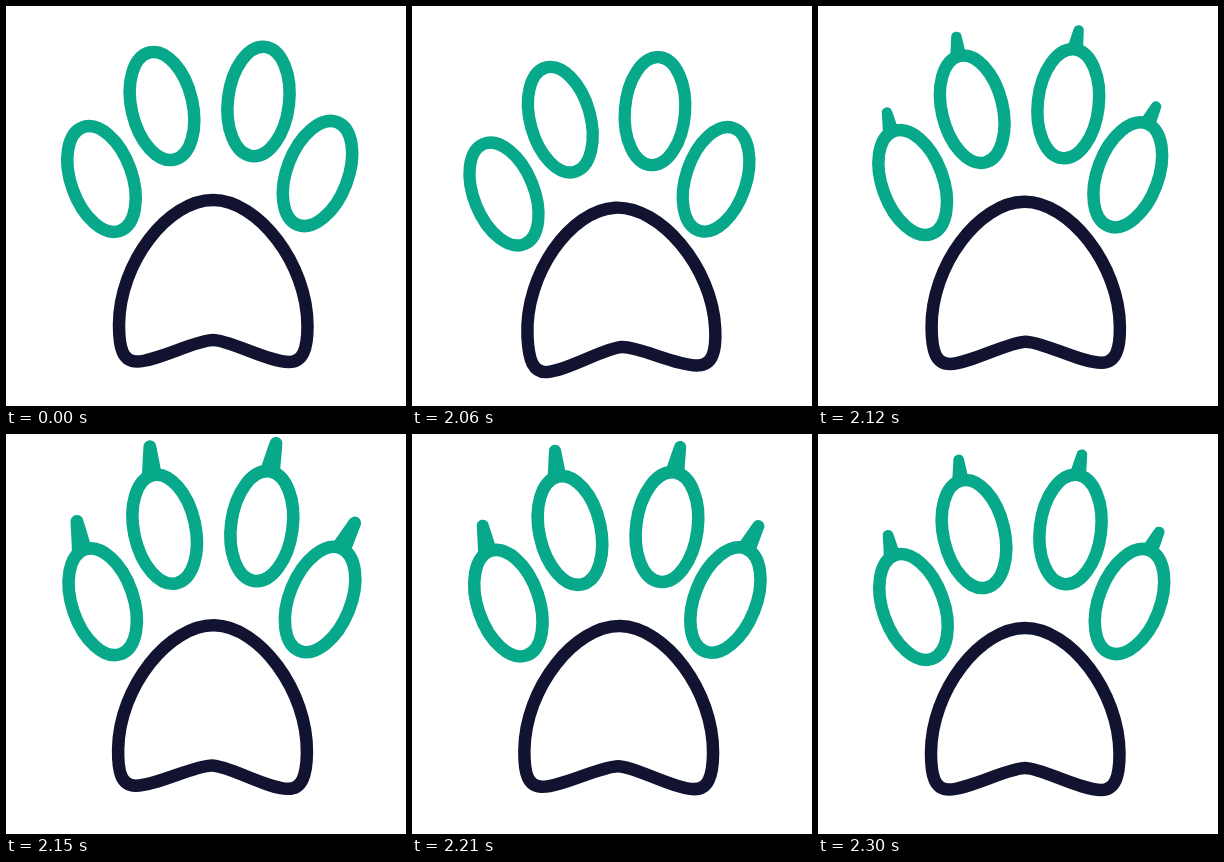
Recreate the animation shown at these times as an HTML page. Size 400x400 px, loop 2330 ms.

```html
<!DOCTYPE html>
<html lang="en">
<head>
<meta charset="utf-8">
<title>Paw</title>
<style>
  @property --sway { syntax: "<number>"; inherits: true; initial-value: 0; }
  @property --claw { syntax: "<number>"; inherits: true; initial-value: 0; }

  html, body { margin: 0; width: 100%; height: 100%; overflow: hidden; background: #fff; }

  svg {
    display: block;
    width: 100%;
    height: 100%;
    fill: none;
    stroke-width: 12.5;
    animation: scratch 2330ms step-end infinite;
  }

  /* Sway turns, shrinks and shifts each part together */
  .pad, .toes {
    transform: matrix(
      calc(1 - var(--k) * var(--sway)), calc(-1 * var(--turn) * var(--sway)),
      calc(var(--turn) * var(--sway)), calc(1 - var(--k) * var(--sway)),
      calc(var(--x) * var(--sway)), calc(var(--y) * var(--sway)));
  }
  .pad { --k: .005; --turn: .055; --x: -4.1; --y: 9.3; stroke: #121331; stroke-linejoin: round; }
  .toes { --k: .02; --turn: .05; --x: -4.8; --y: 11.7; stroke: #08a88a; }

  /* Claws grow in length faster than in width */
  .claw {
    fill: #08a88a;
    stroke: none;
    transform: scale(calc(.35 + .65 * var(--claw)), var(--claw));
  }

  @keyframes scratch {
    0%      { --sway: 0;    --claw: 0; }
    87.124% { --sway: .42;  --claw: 0; }
    88.412% { --sway: .86;  --claw: 0; }
    89.699% { --sway: 1;    --claw: .25; }
    90.987% { --sway: .2;   --claw: .7; }
    92.274% { --sway: -.3;  --claw: 1; }
    93.562% { --sway: -.28; --claw: .97; }
    94.849% { --sway: -.22; --claw: .91; }
    96.137% { --sway: -.14; --claw: .84; }
    97.424% { --sway: -.06; --claw: .78; }
    98.712% { --sway: 0;    --claw: .74; }
    100%    { --sway: 0;    --claw: 0; }
  }
</style>
</head>
<body>
<svg viewBox="-200 -200 400 400">
  <defs>
    <ellipse id="toe" rx="30.6" ry="55"/>
    <path id="nail" d="M-10.5 2C-9-5-8.3-14-6.4-28A6.4 6.4 0 0 1 6.4-28C8.3-14 9-5 10.5 2Z"/>
  </defs>
  <path class="pad" d="M7-6C52-6 101.5 58 101.5 120C101.5 143 97 156 83 156C62 156 24 134 7 134C-10 134-50 155.5-69 155.5C-83 155.5-87 143-87 119C-87 57-38-6 7-6Z"/>
  <g class="toes">
    <use href="#toe" transform="translate(-104.5 -27) rotate(-19.6)"/>
    <use href="#toe" transform="translate(-44 -100) rotate(-13)"/>
    <use href="#toe" transform="translate(52.5 -104.5) rotate(7)"/>
    <use href="#toe" transform="translate(111.5 -32.5) rotate(21)"/>
    <g transform="translate(-126 -79) rotate(-11)"><use class="claw" href="#nail"/></g>
    <g transform="translate(-57.5 -154) rotate(-5)"><use class="claw" href="#nail"/></g>
    <g transform="translate(60 -159.5) rotate(11)"><use class="claw" href="#nail"/></g>
    <g transform="translate(132 -84) rotate(27)"><use class="claw" href="#nail"/></g>
  </g>
</svg>
</body>
</html>
```
